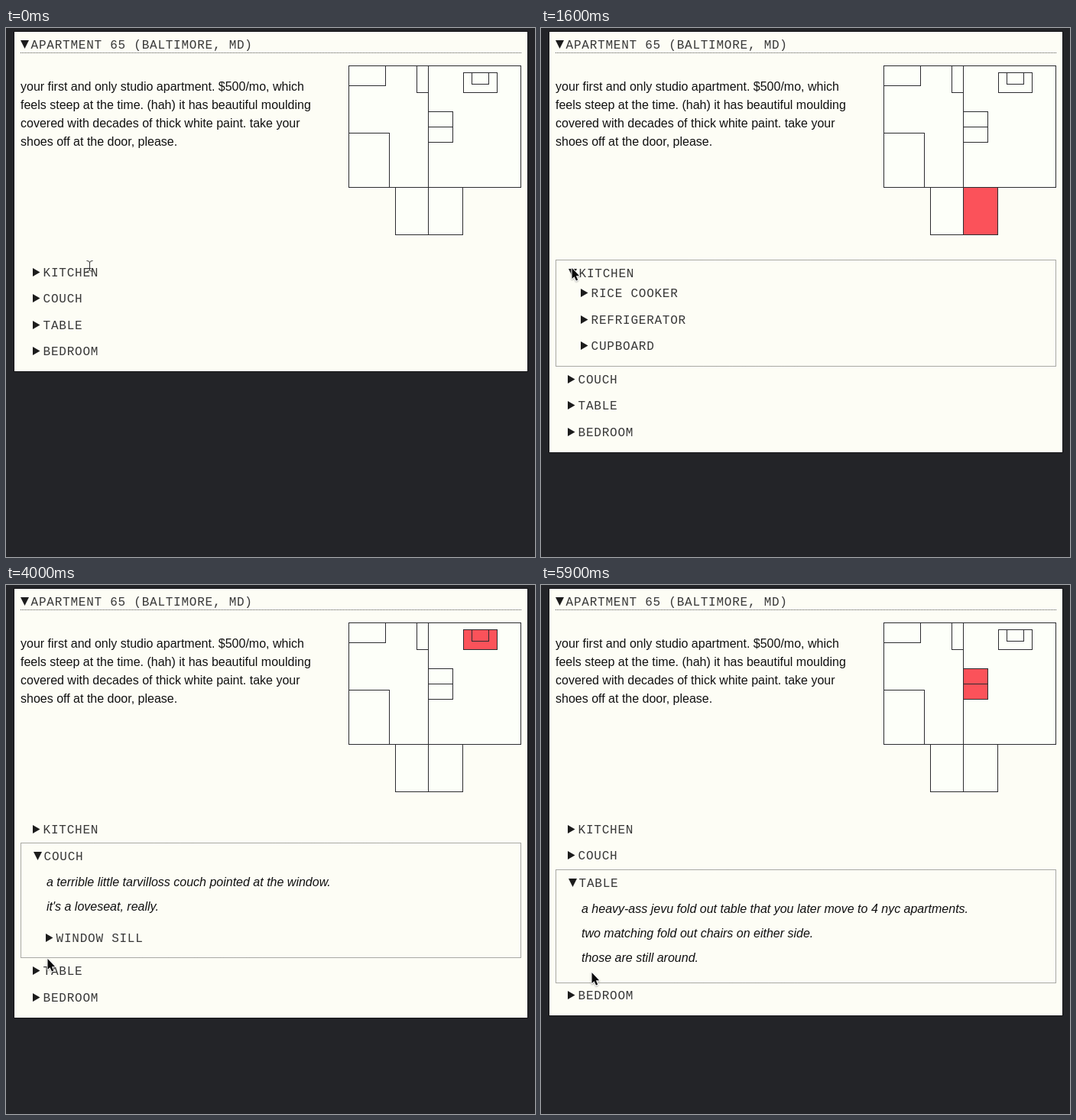
An HTML page with a canvas that plays this animation: 692x692 px, repeating every 7200 ms.

```html
<!DOCTYPE html>
<html lang="en">
<head>
<meta charset="utf-8">
<title>Apartment</title>
<style>
html, body { margin: 0; width: 100%; height: 100%; overflow: hidden; background: #232428; }
canvas { display: block; width: 692px; height: 692px; }
</style>
</head>
<body>
<canvas id="stage"></canvas>
<script>
const SIZE = 692, LOOP = 7200, STEP = 100;
const INK = '#1c1c1c', RED = '#fb525a', PAPER = '#fdfdf5', ROOM = '#fdfff9';
const SANS = '16px "Liberation Sans", Arial, sans-serif';
const MONO = '16px "Liberation Mono", "Courier New", monospace';

const canvas = document.getElementById('stage');
const ctx = canvas.getContext('2d');
const ratio = window.devicePixelRatio || 1;
canvas.width = canvas.height = Math.round(SIZE * ratio);

const intro = [
  'your first and only studio apartment. $500/mo, which',
  'feels steep at the time. (hah) it has beautiful moulding',
  'covered with decades of thick white paint. take your',
  'shoes off at the door, please.'
];

// height: size of the opened box; notes and items: [offset from label, text]
const sections = [
  { name: 'KITCHEN', height: 139, notes: [],
    items: [[26, 'RICE COOKER'], [60.5, 'REFRIGERATOR'], [95, 'CUPBOARD']] },
  { name: 'COUCH', height: 150,
    notes: [[34, 'a terrible little tarvilloss couch pointed at the window.'],
            [66, "it's a loveseat, really."]],
    items: [[106.5, 'WINDOW SILL']] },
  { name: 'TABLE', height: 147.5,
    notes: [[34, 'a heavy-ass jevu fold out table that you later move to 4 nyc apartments.'],
            [66, 'two matching fold out chairs on either side.'],
            [98, 'those are still around.']],
    items: [] },
  { name: 'BEDROOM', height: 0, notes: [], items: [] }
];

// Filled areas of the plan, by section: x, y, w, h
const areas = [[552, 208, 45, 62], [598, 58, 44, 26], [552, 109, 32, 40]];
const planRects = [
  [448, 49, 225, 159], [448, 49, 48, 26], [537, 49, 15, 35], [448, 137, 53, 71],
  [509, 208, 43, 62], [552, 208, 45, 62], [598, 58, 44, 26], [609, 58, 22, 15],
  [552, 109, 32, 20], [552, 129, 32, 20]
];

// Pointer path: time, x, y
const path = [
  [0, 109, 311], [100, 108, 300], [200, 88, 288], [300, 68, 286], [500, 68, 286],
  [1300, 40, 314], [2100, 40, 314], [2400, 32, 370], [2800, 48, 462], [3200, 48, 462],
  [3400, 53, 434], [3500, 53, 434], [3800, 53, 478], [3900, 53, 478], [4000, 54, 489],
  [4200, 54, 537], [4300, 54, 537], [4400, 54, 535], [4500, 54, 542], [4700, 54, 542],
  [4800, 54, 532], [5500, 66, 507], [LOOP, 66, 507]
];

function pointerAt(t) {
  const i = Math.max(1, path.findIndex(k => k[0] >= t));
  const [t0, x0, y0] = path[i - 1], [t1, x1, y1] = path[i];
  let p = (t - t0) / (t1 - t0);
  if (t1 - t0 > 500) p = p * p * (3 - 2 * p);
  return [Math.round(x0 + (x1 - x0) * p), Math.round(y0 + (y1 - y0) * p)];
}

function write(str, x, y, font, color, spacing = 0) {
  ctx.font = font;
  ctx.letterSpacing = spacing + 'px';
  ctx.fillStyle = color;
  ctx.fillText(str, x, Math.round(y));
}

function polygon(points) {
  ctx.beginPath();
  points.forEach(([x, y]) => ctx.lineTo(x, y));
  ctx.closePath();
}

function label(str, x, y, open) {
  const left = open ? x + 1 : x, mid = Math.round(y);
  polygon(open
    ? [[left, mid - 6], [left + 11, mid - 6], [left + 5.5, mid + 5]]
    : [[left, mid - 6], [left + 9.5, mid - 0.5], [left, mid + 5]]);
  ctx.fillStyle = INK;
  ctx.fill();
  write(str, left + 13.6, y + 5, MONO, '#383838', 0.76);
}

function dotted(draw) {
  ctx.setLineDash([1, 1]);
  ctx.strokeStyle = '#555';
  ctx.beginPath();
  draw();
  ctx.stroke();
  ctx.setLineDash([]);
}

function drawPlan(open) {
  ctx.fillStyle = ROOM;
  ctx.fillRect(448, 49, 225, 159);
  ctx.fillRect(509, 208, 88, 62);
  if (areas[open]) {
    ctx.fillStyle = RED;
    ctx.fillRect(...areas[open]);
  }
  ctx.strokeStyle = '#2c2c30';
  planRects.forEach(([x, y, w, h]) => ctx.strokeRect(x + 0.5, y + 0.5, w, h));
  ctx.beginPath();
  ctx.moveTo(552.5, 49);
  ctx.lineTo(552.5, 270);
  ctx.stroke();
}

function drawSections(open) {
  let y = 320;
  sections.forEach((s, i) => {
    if (i !== open) {
      label(s.name, 35, y);
      y += 34.4;
      return;
    }
    const top = Math.floor(y - 16.5), mid = y + 1;
    dotted(() => ctx.rect(19.5, top + 0.5, 654, Math.round(s.height)));
    label(s.name, 35, mid, true);
    s.notes.forEach(([dy, str]) => write(str, 53, mid + dy + 5, 'italic ' + SANS, '#111'));
    s.items.forEach(([dy, str]) => label(str, 52, mid + dy));
    y = y - 16.5 + s.height + 17.5;
  });
}

function panelBottom(open) {
  const growth = open < 0 ? 0 : sections[open].height + 1 - 34.4;
  return Math.round(449.2 + growth);
}

function drawArrow(x, y) {
  ctx.save();
  ctx.translate(x, y);
  polygon([[0.5, 0], [0.5, 14], [3.6, 11.2], [6, 16.6], [8.2, 15.6], [5.9, 10.3], [10.2, 10.2]]);
  ctx.lineJoin = 'round';
  ctx.lineWidth = 2;
  ctx.strokeStyle = '#fff';
  ctx.shadowColor = 'rgba(0,0,0,.3)';
  ctx.shadowBlur = 2;
  ctx.shadowOffsetY = 1;
  ctx.stroke();
  ctx.shadowColor = 'transparent';
  ctx.fillStyle = '#0a0a0a';
  ctx.fill();
  ctx.restore();
}

function drawBeam(x, y) {
  ctx.save();
  ctx.translate(x + 0.5, y + 0.5);
  ctx.beginPath();
  for (const s of [-1, 1]) {
    ctx.moveTo(-4, 7 * s);
    ctx.quadraticCurveTo(0, 7 * s, 0, 4.5 * s);
    ctx.quadraticCurveTo(0, 7 * s, 4, 7 * s);
  }
  ctx.moveTo(0, -5);
  ctx.lineTo(0, 5);
  ctx.moveTo(-2, 3);
  ctx.lineTo(2, 3);
  ctx.strokeStyle = '#333';
  ctx.stroke();
  ctx.restore();
}

function draw(t) {
  const open = t < 1600 ? -1 : t < 3000 ? 0 : t < 5700 ? 1 : 2;
  const bottom = panelBottom(open);
  ctx.setTransform(ratio, 0, 0, ratio, 0, 0);
  ctx.lineWidth = 1;
  ctx.fillStyle = '#232428';
  ctx.fillRect(0, 0, SIZE, SIZE);
  ctx.fillStyle = '#131316';
  ctx.fillRect(10, 4, 673, bottom - 3);
  ctx.fillStyle = PAPER;
  ctx.fillRect(11, 5, 671, bottom - 5);

  label('APARTMENT 65 (BALTIMORE, MD)', 18, 22, true);
  dotted(() => {
    ctx.moveTo(19, 32.5);
    ctx.lineTo(674, 32.5);
  });
  intro.forEach((line, i) => write(line, 19, 82 + i * 24, SANS, '#111'));
  drawPlan(open);
  drawSections(open);

  const beam = t < 100 || (t >= 4100 && t < 5700);
  (beam ? drawBeam : drawArrow)(...pointerAt(t));
}

const start = performance.now();
function tick() {
  const t = (performance.now() - start) % LOOP;
  draw(Math.floor(t / STEP) * STEP);
  requestAnimationFrame(tick);
}
tick();
</script>
</body>
</html>
```
